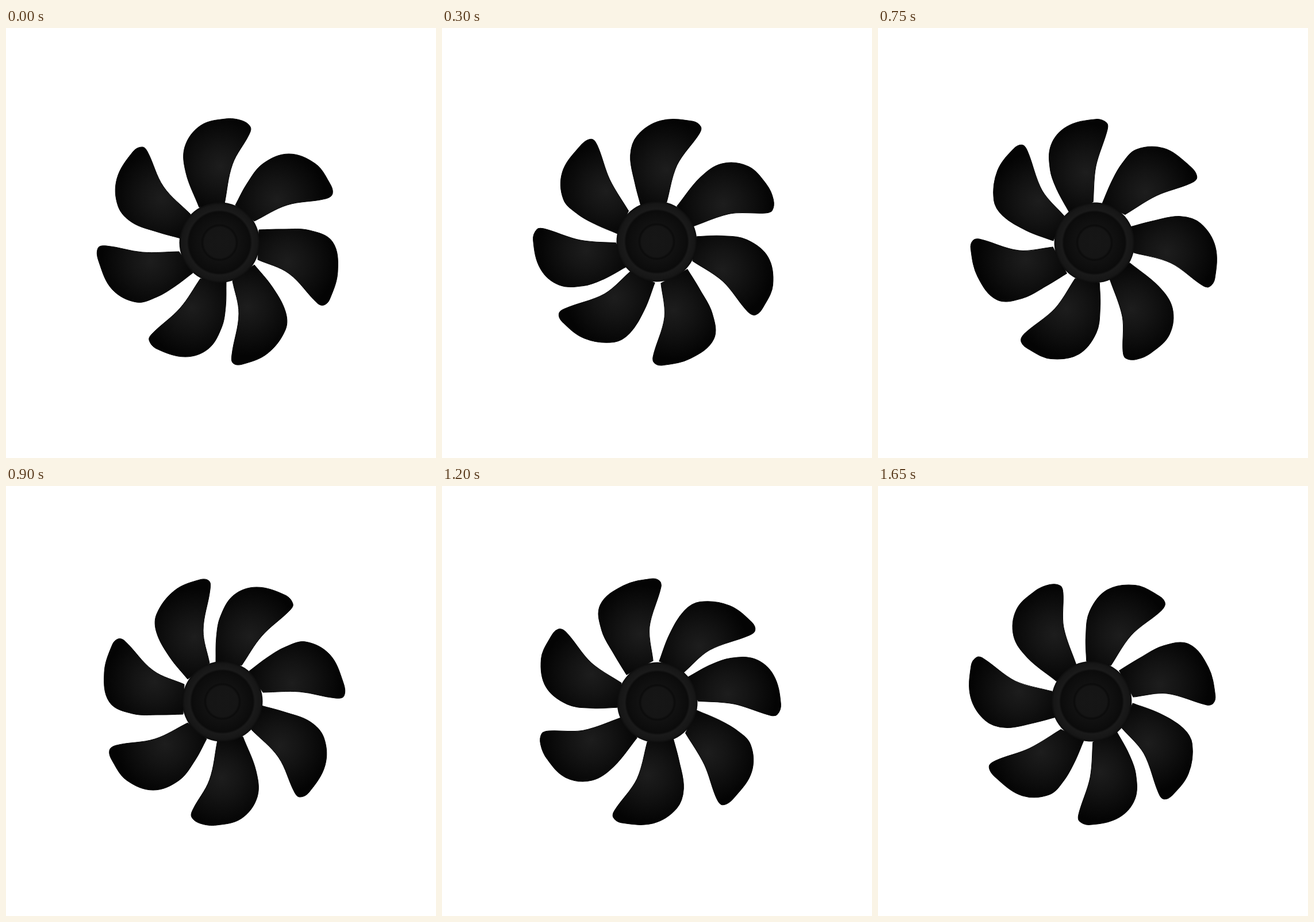
Animation, 748 px wide and 748 px high, one loop 1800 ms. Source, as an HTML page with a canvas:

```html
<!DOCTYPE html>
<html lang="en">
<head>
<meta charset="utf-8">
<title>Fan</title>
<style>
  html, body { margin: 0; width: 100%; height: 100%; overflow: hidden; background: #fff; }
  canvas { display: block; width: 748px; height: 748px; }
</style>
</head>
<body>
<canvas id="stage" width="748" height="748"></canvas>
<script>
const ctx = document.getElementById('stage').getContext('2d');
const CENTER = 374, STEP_MS = 150, STEPS = 12;
const HUB = [371.5, 373.2];

// Each outline runs from the hub along the concave edge, round the tip and back.
const outlines = [
  '380,306 394,237 423,185 425,172 410,161 382,158 338,170 311,207 313,252 336,312',
  '432,336 489,308 556,297 568,288 562,268 538,236 492,219 447,236 419,271 399,308',
  '438,403 492,427 542,479 553,482 563,472 577,424 568,372 528,352 482,350 440,351',
  '394,440 405,497 393,568 395,583 411,585 455,566 486,525 486,493 463,450 432,412',
  '338,436 303,487 254,532 249,543 262,558 312,572 352,558 375,521 382,485 383,441',
  '301,389 237,390 175,379 160,383 162,408 185,455 227,477 262,468 293,450 325,426',
  '321,324 274,276 246,215 237,207 221,215 193,262 195,310 219,338 264,355 304,366'
];

function smoothPath(points) {
  const path = new Path2D();
  const tangent = i => {
    const a = points[Math.max(i - 1, 0)];
    const b = points[Math.min(i + 1, points.length - 1)];
    const length = Math.hypot(b[0] - a[0], b[1] - a[1]);
    return [(b[0] - a[0]) / length, (b[1] - a[1]) / length];
  };
  path.moveTo(...points[0]);
  for (let i = 1; i < points.length; i++) {
    const [p, q] = [points[i - 1], points[i]];
    const [u, v] = [tangent(i - 1), tangent(i)];
    const h = Math.hypot(q[0] - p[0], q[1] - p[1]) * 0.35;
    path.bezierCurveTo(p[0] + u[0] * h, p[1] + u[1] * h,
                       q[0] - v[0] * h, q[1] - v[1] * h, ...q);
  }
  path.closePath();
  return path;
}

function radial([x, y], inner, outer, stops) {
  const gradient = ctx.createRadialGradient(x, y, inner, x, y, outer);
  stops.forEach(([at, color]) => gradient.addColorStop(at, color));
  return gradient;
}

const blades = outlines.map(text => {
  const points = text.split(' ').map(pair => pair.split(',').map(Number));
  const [edge, back] = [points[1], points[8]];
  const glow = [0, 1].map(k => edge[k] * 0.75 + back[k] * 0.25);
  return {
    path: smoothPath(points),
    fill: radial(glow, 0, 85, [[0, '#1d1d1d'], [0.4, '#141414'], [1, '#040404']])
  };
});

const hubFill = radial(HUB, 0, 70, [
  [0, '#161616'], [0.38, '#151515'], [0.43, '#0b0b0b'], [0.47, '#111'],
  [0.68, '#0d0d0d'], [0.76, '#0b0b0b'], [0.81, '#1a1a1a'], [0.94, '#161616'], [1, '#0c0c0c']
]);

function draw() {
  const step = Math.floor(performance.now() / STEP_MS) % STEPS;
  ctx.clearRect(0, 0, 748, 748);
  ctx.save();
  ctx.translate(CENTER, CENTER);
  ctx.rotate(step / STEPS * 2 * Math.PI);
  ctx.translate(-CENTER, -CENTER);
  for (const { path, fill } of blades) {
    ctx.fillStyle = fill;
    ctx.fill(path);
    ctx.lineWidth = 1;
    ctx.strokeStyle = '#060606';
    ctx.stroke(path);
  }
  ctx.fillStyle = hubFill;
  ctx.beginPath();
  ctx.arc(...HUB, 70, 0, 2 * Math.PI);
  ctx.fill();
  ctx.restore();
  requestAnimationFrame(draw);
}
draw();
</script>
</body>
</html>
```
